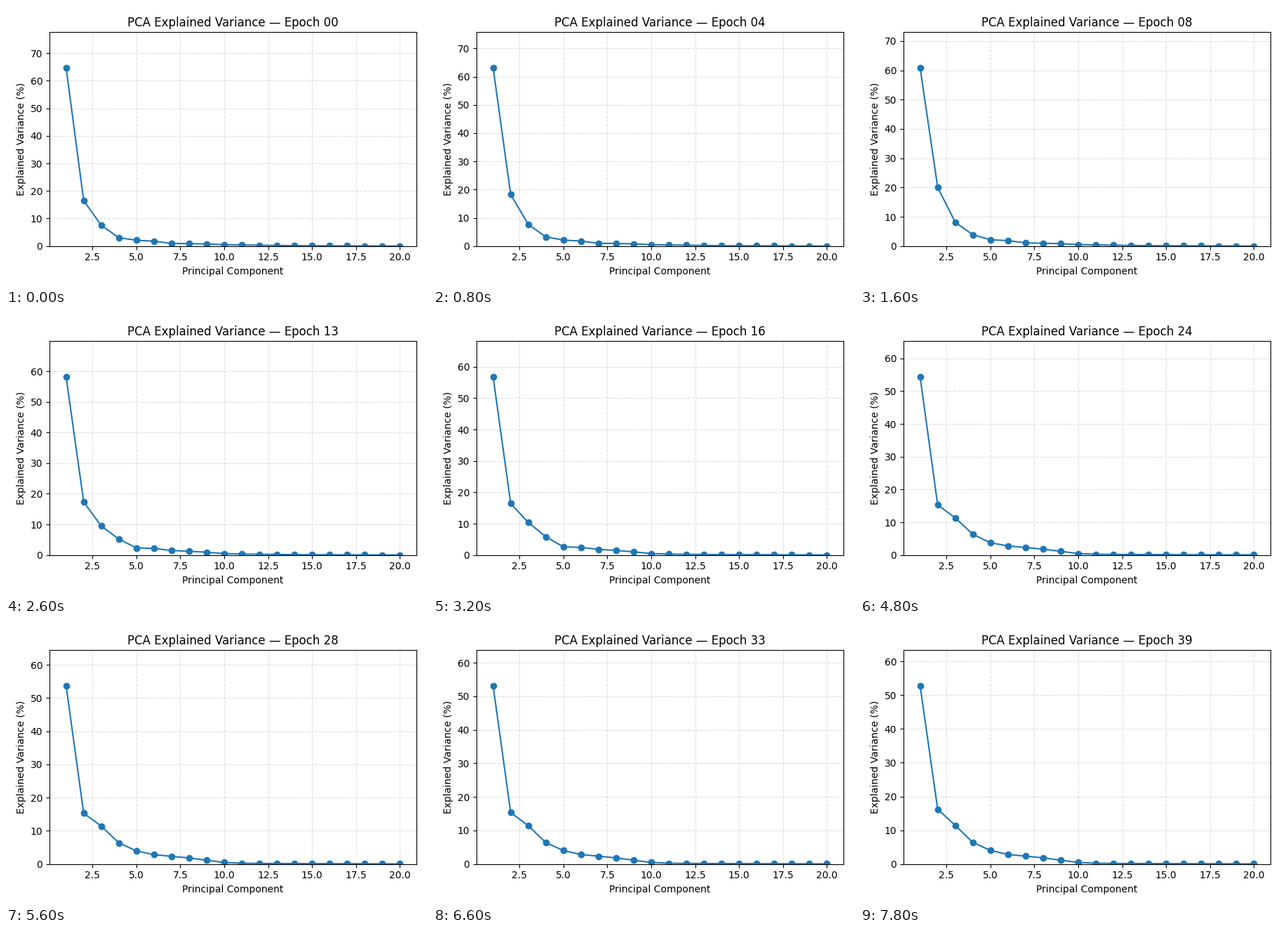
Recreate the animation shown at these times as a matplotlib script. Size 600 by 400 pixels, loop 8000 ms.

```python
import numpy as np
import matplotlib.pyplot as plt
from matplotlib.animation import FuncAnimation

EPOCHS = 40
STEP_MS = 200
PCS = np.arange(1, 21)
MINOR = PCS[2:]

# Minor components drift from an early spectrum to a late one
EARLY = np.interp(MINOR, [3, 4, 5, 6, 7, 9, 10, 14, 20],
                  [7.5, 2.95, 2.1, 1.75, 0.95, 0.78, 0.5, 0.12, 0])
LATE = np.interp(MINOR, [3, 4, 5, 6, 8, 10, 11, 12, 20],
                 [11.45, 6.4, 4.05, 2.85, 1.85, 0.47, 0.25, 0.18, 0.05])
MIDPOINT = np.interp(MINOR, [3, 4, 5, 6], [13, 11, 19, 14.5])


def variance(epoch):
    first = 52.5 + 12.15 * np.exp(-(epoch / 15.6) ** 1.47)
    second = np.interp(epoch, [0, 8, 13, 20, 33, 39],
                       [16.5, 20.05, 17.35, 15.25, 15.35, 16.25])
    mix = 1 / (1 + np.exp((MIDPOINT - epoch) / 3))
    return np.concatenate([[first, second], EARLY + (LATE - EARLY) * mix])


fig, ax = plt.subplots(figsize=(6, 4), dpi=100)
line, = ax.plot(PCS, variance(0), marker="o")
ax.set_xlabel("Principal Component")
ax.set_ylabel("Explained Variance (%)")
ax.grid(True, linestyle="--", alpha=0.4)


def update(epoch):
    values = variance(epoch)
    line.set_ydata(values)
    ax.set_ylim(0, values.max() * 1.2)
    ax.set_title(f"PCA Explained Variance — Epoch {epoch:02d}")
    return line,


update(0)
fig.tight_layout()

anim = FuncAnimation(fig, update, frames=EPOCHS, interval=STEP_MS,
                     repeat=True, repeat_delay=0, blit=False)
plt.show()
```
